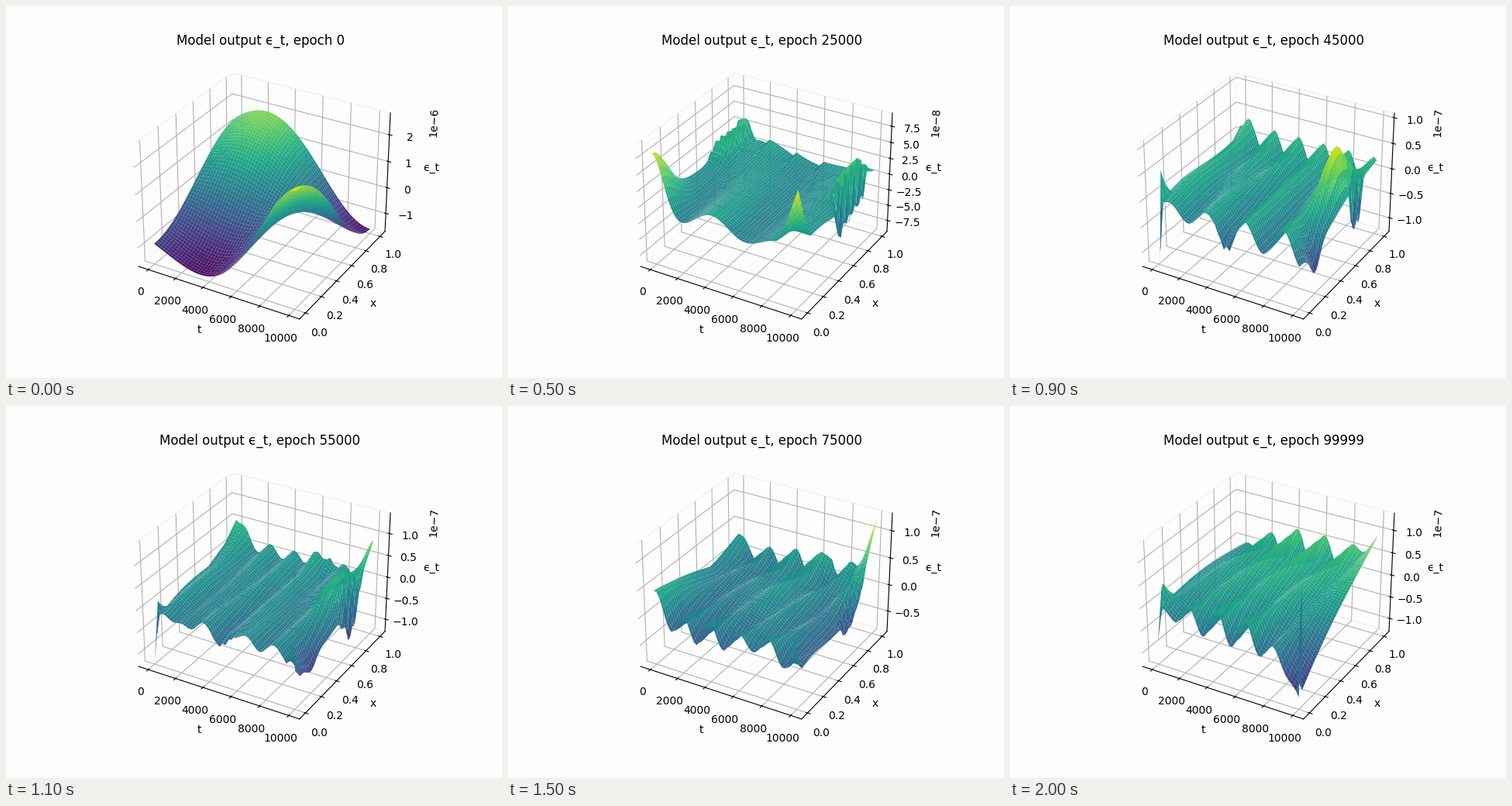
These frames come from a looping animation (640 px wide and 480 px high, 2.1 s). A matplotlib script:

```python
import numpy as np
import matplotlib.pyplot as plt
from matplotlib.animation import FuncAnimation

FRAMES, STEP, LAST = 21, 5000, 99999
PAPER = "#fdfdfd"

s = np.linspace(0, 1, 51)
T, X = np.meshgrid(s, s)
ARCH = np.sin(np.pi * T)


def mix(front, back):
    """Cosine blend from x = 0 to x = 1."""
    k = np.sin(np.pi * X / 2) ** 2
    return front * (1 - k) + back * k


def wave(peak, period, skew=0.0):
    return np.cos(2 * np.pi * (T - peak - skew * X) / period)


def tent(t, wt, x, wx):
    return (np.maximum(0, 1 - abs(T - t) / wt)
            * np.maximum(0, 1 - abs(X - x) / wx))


def bump(t, wt, x, wx):
    return np.exp(-((T - t) / wt) ** 2 - ((X - x) / wx) ** 2)


def step(v, k=60):
    return 0.5 + 0.5 * np.tanh(k * v)


def band(x0, x1):
    return step(X - x0) * step(x1 - X)


def teeth(x0, x1):
    """Jagged cliff along the far end of t."""
    return band(x0, x1) * step(T - 0.975 + 0.02 * np.cos(80 * X), 120)


# Heights are fractions of the z axis.
def saddle():
    front = 0.495 - 0.46 * np.cos(-0.8 + 1.6 * T + 2.3 * T ** 2)
    back = 0.42 + 0.38 * np.cos(-0.81 + 3.4 * T + 0.55 * T ** 2)
    return mix(front, back)


def cliff():
    z = mix(0.47 + 0.1 * wave(.42, .55), 0.46 + 0.07 * wave(.2, .75))
    z += 0.38 * bump(0, .1, 0, .2) - 0.1 * bump(0, .05, .93, .1)
    z += 0.45 * tent(1, .11, 0, .14)
    z += 0.42 * band(.56, .9) * step(T - .92) * np.sin(np.pi * X) ** 0.3
    return z - 0.75 * teeth(.54, .88)


def corners():
    z = mix(0.49 + 0.05 * wave(.4, .4), 0.51)
    z += 0.44 * bump(0, .1, 0, .2) + 0.47 * tent(1, .13, 0, .15)
    jag = 1 + 0.25 * np.sin(90 * X)
    z += 0.34 * step(.1 - T, 40) * step(X - .64, 20) * X * jag
    z += 0.09 * step(X - .85, 20) * (1 - np.mod(T * 5 - .2, 1)) * step(T - .15)
    return z - 0.08 * bump(1, .1, .5, .15) + 0.15 * tent(1, .08, .85, .2)


def ridges():
    z = mix(0.48 + (0.04 + 0.1 * T) * wave(.62, .265), 0.55)
    z += 0.1 * X ** 2 * wave(.26, .18) + 0.08 * bump(0, .2, .3, .3)
    z -= 0.1 * tent(.5, .08, 0, .1) * (1 + np.sin(150 * T))
    z += 0.25 * tent(0, .05, .06, .07) - 0.75 * tent(0, .04, 0, .06)
    z += 0.15 * tent(0, .1, 1, .15) + 0.4 * bump(.92, .05, .58, .2)
    return z - 0.2 * bump(1, .06, .2, .08) - 0.35 * teeth(.66, .8)


def spikes():
    z = 0.36 + 0.05 * X + 0.045 * (1 - X) * wave(.37, .155, .1)
    z += 0.1 * bump(.75, .08, 0, .35) - 0.08 * bump(0, .1, 0, .3)
    z -= 0.2 * T ** 10 * (1 - X ** 4)
    z += 0.55 * tent(.98, .03, 0, .06) - 0.1 * bump(1, .06, 0, .12)
    z += 0.55 * tent(1, .12, 1, .3) + 0.3 * tent(0, .13, 1, .35)
    z += 0.24 * tent(.7, .06, 1, .12) + 0.15 * tent(.58, .08, 1, .2)
    z += 0.18 * bump(.92, .05, .75, .15)
    return z - 0.2 * teeth(.57, .86)


def waves():
    z = mix(0.38 + 0.09 * T, 0.34 + 0.14 * ARCH)
    swell = (0.06 + 0.15 * ARCH) * (0.25 + 0.75 * (2 * X - 1) ** 2)
    z += swell * wave(0, .2, .235) * step(.94 - T, 25)
    z += 0.55 * np.exp(-(T / .07) ** 2) * np.cos(np.pi * X / 2) ** 2
    z += 0.14 * bump(.55, .13, .55, .25)
    return z + 0.62 * T ** 7 * X ** 5


def folds():
    z = mix(0.45 + 0.07 * T, 0.44 + 0.14 * ARCH) + 0.05 * np.sin(np.pi * X)
    swell = ARCH * (0.04 + 0.1 * (2 * X - 1) ** 2)
    z += swell * wave(.03, .2, .2)
    z += 0.17 * tent(0, .08, .08, .1) - 0.3 * tent(0, .04, 0, .06)
    z += T ** 6 * (0.81 * X - 0.42)
    return z + 0.9 * tent(1, .02, .02, .02)


# Step, heights, depth below zero, height above zero.
KEYS = [(0, saddle(), 1.71e-6, 2.80e-6),
        (3, cliff(), 0.97e-7, 1.045e-7),
        (7, corners(), 8.90e-8, 8.68e-8),
        (9, ridges(), 1.28e-7, 1.09e-7),
        (13, spikes(), 1.30e-7, 1.956e-7),
        (17, waves(), 6.14e-8, 8.86e-8),
        (20, folds(), 1.304e-7, 1.377e-7)]


def state(i):
    """Heights and z limits at step i, blended between the nearest keys."""
    for (i0, z0, d0, u0), (i1, z1, d1, u1) in zip(KEYS, KEYS[1:]):
        if i <= i1:
            break
    k = (i - i0) / (i1 - i0)
    lo = -d0 ** (1 - k) * d1 ** k
    hi = u0 ** (1 - k) * u1 ** k
    z = np.clip((1 - k) * z0 + k * z1, .021, .979)
    return lo + (hi - lo) * z, lo, hi


fig = plt.figure(figsize=(6.4, 4.8), dpi=100, facecolor=PAPER)
ax = fig.add_subplot(projection="3d", facecolor=PAPER)
for axis in (ax.xaxis, ax.yaxis, ax.zaxis):
    axis.set_pane_color(PAPER)
    axis.pane.set_edgecolor("#f2f2f2")
pad = 0.05 + 1.1 / 48
ax.set_xlim(-1e4 * pad, 1e4 * (1 + pad), view_margin=0)
ax.set_ylim(-pad, 1 + pad, view_margin=0)
ax.set_xlabel("t")
ax.set_ylabel("x")
ax.set_zlabel("ϵ_t")


def update(i):
    for old in list(ax.collections):
        old.remove()
    z, lo, hi = state(i)
    ax.plot_surface(1e4 * T, X, z, cmap="viridis", rstride=1, cstride=1,
                    vmin=lo, vmax=hi)
    ax.set_zlim(lo, hi, view_margin=0)
    ax.set_title(f"Model output ϵ_t, epoch {min(STEP * i, LAST)}")


anim = FuncAnimation(fig, update, frames=FRAMES, interval=100, repeat=True,
                     repeat_delay=0)
plt.show()
```
